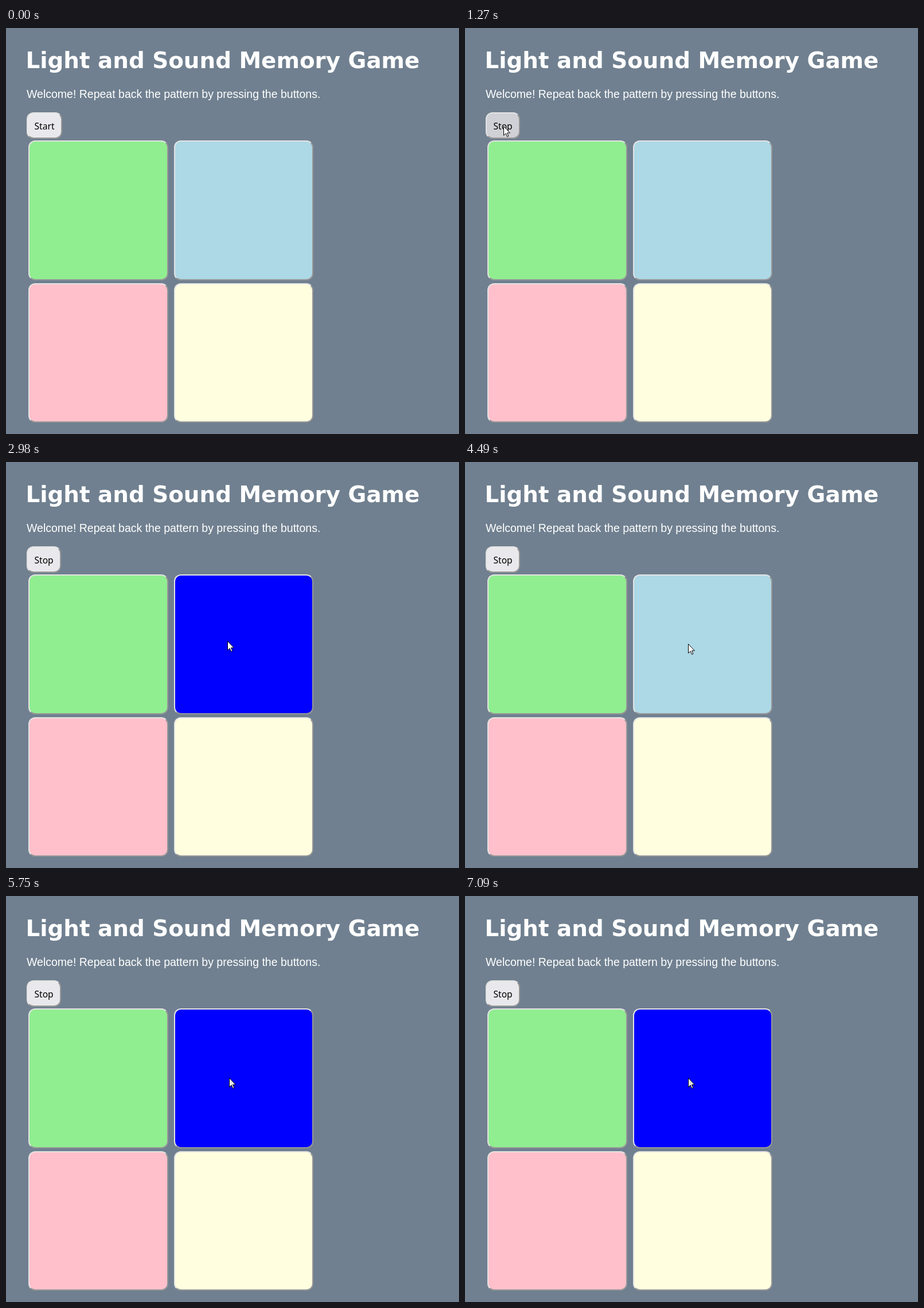
Write an HTML page that moves like this. It is 790 px wide and 708 px high and loops after 8 s.

```html
<!DOCTYPE html>
<html lang="en">
<head>
<meta charset="utf-8">
<title>Light and Sound Memory Game</title>
<style>
  html, body { margin: 0; width: 100%; height: 100%; overflow: hidden; background: #708090; }
  #stage { position: absolute; left: 0; top: 0; width: 790px; height: 708px; overflow: hidden; }
  text { white-space: pre; }
  svg { position: absolute; left: 0; top: 0; width: 790px; height: 708px; }
  .button {
    position: absolute; box-sizing: border-box; border-radius: 12px;
    border: 2px solid; border-color: #e3e3e3 #979797 #979797 #e3e3e3;
  }
  .button.pressed { border-color: #979797 #e3e3e3 #e3e3e3 #979797; }
  .pad { width: 243.5px; height: 243.5px; }
  #control { left: 36px; top: 146.5px; height: 46.5px; }
</style>
</head>
<body>
<div id="stage">
  <div id="control" class="button"></div>
  <div class="button pad" style="left:39px; top:196px; background:#90ee90"></div>
  <div class="button pad" style="left:292.5px; top:196px" id="blue"></div>
  <div class="button pad" style="left:39px; top:444.5px; background:#ffc0cb"></div>
  <div class="button pad" style="left:292.5px; top:444.5px; background:#ffffe0"></div>
  <svg viewBox="0 0 790 708">
    <text x="34.5" y="70" fill="#fff" font-family="'DejaVu Sans', sans-serif" font-weight="700" font-size="38.85">Light and Sound Memory Game</text>
    <text x="36" y="122" fill="#fff" font-family="'Liberation Sans', sans-serif" font-size="19.5">Welcome! Repeat back the pattern by pressing the buttons.</text>
    <text id="label" x="49.5" y="177" font-family="'Noto Sans', sans-serif" font-size="15.6">Start</text>
    <path id="cursor" d="M.5 .5V16.3L4.1 12.9L6.6 18.5L8.9 17.5L6.5 12H11.4Z" stroke-width="1"/>
  </svg>
</div>
<script>
  const LOOP = 8000;
  const find = id => document.getElementById(id);
  const [control, blue, label, cursor] = ['control', 'blue', 'label', 'cursor'].map(find);
  const within = (t, from, to) => t >= from && t < to;
  const mix = (a, b, u) => a + (b - a) * u;

  // The pointer is seen in discrete steps: 0 at the first, 1 at the last.
  const stepped = (t, from, to, steps) =>
    Math.min(1, Math.floor((t - from) / (to - from) * (steps - 1) + 0.01) / (steps - 1));

  function pointerAt(t) {
    if (t < 950) {
      const left = 1 - stepped(t, 130, 880, 12);
      return [mix(69, 680, left ** 2), mix(171, 595, left ** 2.4)];
    }
    if (t < 1470) return [67, 171];
    if (t < 2840) {
      const u = (1 + 10 * stepped(t, 1470, 2170, 11)) / 11;
      const ease = u * u * (3 - 2 * u);
      return [mix(67, 377, ease), mix(171, 302, ease)];
    }
    if (t < 4490) {
      const u = (1 + 2 * stepped(t, 2840, 2980, 3)) / 3;
      return [mix(377, 386, u), mix(302, 312, u)];
    }
    return [389, 317];
  }

  function draw(t) {
    const [x, y] = pointerAt(t).map(Math.round);
    const shown = t >= 130;
    const hover = shown && x >= 36 && x < 97 && y >= 147 && y < 193;
    const started = t >= 1270;
    const controlPressed = within(t, 1200, 1270);
    const padPressed = within(t, 4560, 4760);
    const lit = within(t, 2300, 3310) || padPressed || within(t, 5750, 6750) || t >= 7090;

    label.textContent = started ? 'Stop' : 'Start';
    control.style.width = started ? '60px' : '62px';
    control.style.background = controlPressed ? '#b1b1b9' : hover ? '#d0d0d7' : '#e9e9ed';
    control.classList.toggle('pressed', controlPressed);
    blue.style.background = lit ? '#0000ff' : '#add8e6';
    blue.classList.toggle('pressed', padPressed);

    cursor.style.display = shown ? '' : 'none';
    cursor.setAttribute('transform', `translate(${x} ${y})`);
    cursor.setAttribute('fill', t < 4760 ? '#fff' : '#e6e6e6');
    cursor.setAttribute('stroke', within(t, 4760, 5750) ? '#505050' : '#000');
  }

  const start = performance.now();
  function tick() {
    draw((performance.now() - start) % LOOP);
    requestAnimationFrame(tick);
  }
  draw(0);
  requestAnimationFrame(tick);
</script>
</body>
</html>
```
